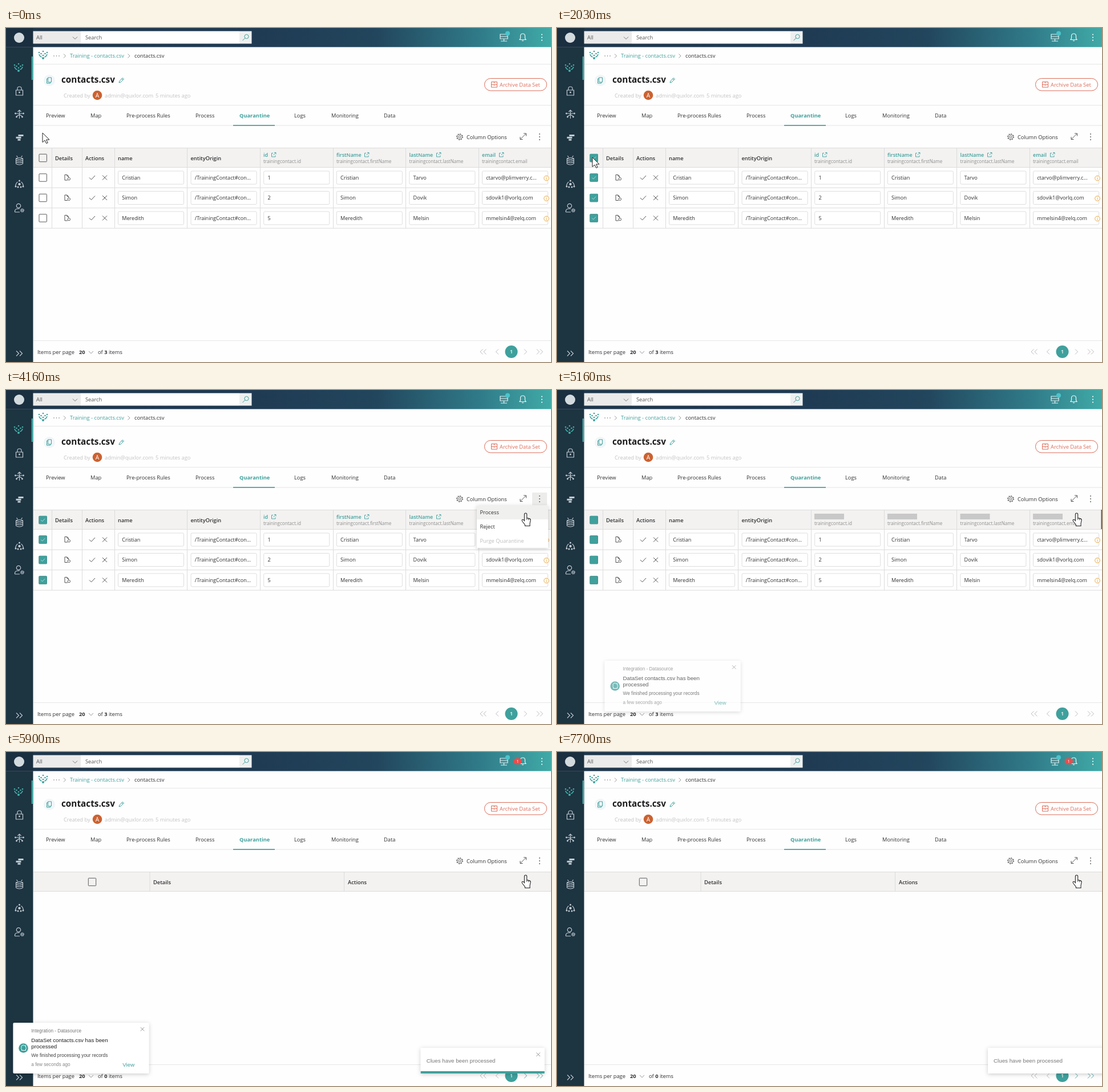
An HTML page for the animation above (7.73 s loop, 955x586 px).

```html
<!DOCTYPE html>
<html lang="en">
<head>
<meta charset="utf-8">
<title>Quarantine</title>
<style>
html, body { margin: 0; width: 100%; height: 100%; overflow: hidden; background: #fefefe; }
svg { display: block; width: 100vw; height: 100vh; font-family: "Open Sans", "Noto Sans", sans-serif; }
.arial { font-family: "Liberation Sans", Arial, sans-serif; }
</style>
</head>
<body>
<svg id="stage" viewBox="0 0 955 586"></svg>
<script>
const LOOP = 7730;
const TEAL = '#3fa09c', INK = '#303030', RED = '#dd6b57', LINE = '#dcdcdc', PALE = '#c3c3c3';

const text = (x, y, s, fill = INK, size = 9.3, weight = 400, more = '') =>
  `<text x="${x}" y="${y}" fill="${fill}" font-size="${size}" font-weight="${weight}" ${more}>${s}</text>`;
const rect = (x, y, w, h, fill, more = '') =>
  `<rect x="${x}" y="${y}" width="${w}" height="${h}" fill="${fill}" ${more}/>`;
const path = (d, stroke = INK, width = 1, fill = 'none') =>
  `<path d="${d}" fill="${fill}" stroke="${stroke}" stroke-width="${width}"/>`;
const dot = (x, y, r, fill) => `<circle cx="${x}" cy="${y}" r="${r}" fill="${fill}"/>`;
const ring = (x, y, r, stroke, width = 1) =>
  `<circle cx="${x}" cy="${y}" r="${r}" fill="none" stroke="${stroke}" stroke-width="${width}"/>`;
const at = (x, y, body) => `<g transform="translate(${x} ${y})">${body}</g>`;
const group = (id, body, more = '') => `<g id="${id}" ${more}>${body}</g>`;
const hline = y => rect(48, y, 907, 1, '#e6e6e6');
const cross = (x, y, r, c = INK) => path(`M${x - r} ${y - r}l${2 * r} ${2 * r}m0 ${-2 * r}l${-2 * r} ${2 * r}`, c, .9);
const dots = (x, y, c, r = 1) => [-5, 0, 5].map(d => dot(x, y + d, r, c)).join('');
const gear = (x, y, r, c) => ring(x, y, r * .38, c, .8) + ring(x, y, r * .82, c, .8) +
  `<circle cx="${x}" cy="${y}" r="${r}" fill="none" stroke="${c}" stroke-width="1.2" stroke-dasharray="${r * .3} ${r * .485}"/>`;

// Icons drawn around their own centre
const flow = c => path('M-7-1Q-6 3-2.5 4M7-1Q6 3 2.5 4', c, 1.5) + dot(0, 6, 2, c) +
  [[-7, -4], [7, -4], [0, -6], [-3.5, -2], [3.5, -2], [0, 1]].map(([x, y]) => dot(x, y, 1.3, c)).join('');
const G = '#c3ccd2';
const sideIcons = [
  [22, 69, flow('#45b0aa')],
  [23.5, 111, path('M-6-2H6V7H-6ZM-3.5-2V-5Q-3.5-8 0-8T3.5-5V-2', G, 1.2) + dot(0, 2, 1.4, G)],
  [23.5, 151, path('M0 8V-7M-3-4L0-7 3-4M-6-1H6M-5 4L0 1 5 4', G, 1.1) +
    [[-7, -1], [7, -1], [-5, 5], [5, 5]].map(([x, y]) => dot(x, y, 1.4, G)).join('')],
  [23.5, 192, rect(-2, -5, 9, 3, G) + rect(-6, -1.2, 9, 3, G) + rect(-3, 2.6, 5, 3, G)],
  [23.5, 233, path('M-6-4Q0-7 6-4V5Q0 9-6 5ZM-6-4Q0-1 6-4M-6-1Q0 2 6-1M-6 2Q0 5 6 2M-3-6L-5-9M3-6L5-9', G, 1.1)],
  [23.5, 274, dot(0, 0, 2.2, G) + path('M-7 3Q-6-2-3-4M7 3Q6-2 3-4', G, 1.2) +
    [[0, -6], [-6.5, 4], [6.5, 4], [-2.5, 5], [2.5, 5]].map(([x, y]) => dot(x, y, 1.5, G)).join('')],
  [22, 316, ring(0, -4, 3.7, G, 1.2) + path('M-6.5 7V5Q-6 1 0 1H2M-6.5 7H2', G, 1.2) + gear(6.5, 4, 3, G)],
  [23, 571, path('M-5-4.5l4.5 4.5-4.5 4.5M1-4.5l4.5 4.5L1 4.5', G, 1.1)]
];

const topBar = rect(0, 0, 955, 33.5, 'url(#bar)') + rect(0, 0, 47.5, 33.5, '#1a2f40') +
  dot(23, 17, 9, '#d3dade') +
  rect(47.5, 5.5, 83.5, 22, '#ebebeb') + rect(131, 5.5, 278, 22, '#fff') + rect(409, 5.5, 21.5, 22, '#eef0f0') +
  text(53, 20, 'All', '#555') + path('M117 15.5l4 4 4-4', '#777') + text(139, 20, 'Search', '#555') +
  ring(421.5, 15, 3.6, TEAL) + path('M419 17.5l-4.5 4.5', TEAL) +
  path('M866 11h13v4h-13zM866 15h13v4h-13zM872.5 19v4M867 23h11', '#e8f2f3', 1.2) + dot(879, 9.5, 4, '#4cc4cb') +
  path('M900 20.5h11l-1.5-2.5v-4q0-4-4-4t-4 4v4zM904 22.5h3', '#eef7f7', 1.2) + dots(939, 16.5, '#fff', 1.1);

const sidebar = rect(0, 33.5, 47.5, 552.5, '#1d3441') + rect(44.7, 50, 2.8, 41, '#43aaa5') +
  sideIcons.map(([x, y, body]) => at(x, y, body)).join('');

const tabs = [[70, 'Preview'], [148, 'Map'], [211, 'Pre-process Rules'], [332, 'Process'],
  [505, 'Logs'], [570, 'Monitoring'], [662, 'Data']];

const heading = at(65, 47, flow(TEAL)) + [84, 88.5, 93].map(x => dot(x, 49, .8, '#777')).join('') +
  path('M101 45.5l3.5 3.5-3.5 3.5M213.5 45.5l3.5 3.5-3.5 3.5', '#999') +
  text(112, 51.5, 'Training - contacts.csv', TEAL) + text(225, 52, 'contacts.csv') + hline(63) +
  dot(76, 92, 10, '#f0f6f8') + path('M73.5 87h6v8h-6zM73.5 89h-2v8h6v-2', TEAL) +
  text(97, 96, 'contacts.csv', '#1c1c1c', 15.3, 700) +
  path('M198 96l1-3 5.5-5.5 2 2-5.5 5.5zM203 89l2 2', TEAL) +
  text(101, 121.5, 'Created by', PALE) + dot(160, 118, 8.3, '#cb6231') +
  text(160, 121.8, 'A', '#fff', 10, 400, 'text-anchor="middle"') +
  text(173, 121.5, 'admin@quxlor.com', PALE) + text(262, 121.5, '5 minutes ago', PALE) +
  `<rect x="838.5" y="88.5" width="109" height="21.5" rx="10.7" fill="#fff" stroke="${RED}"/>` +
  path('M850.5 94.5h10v9.5h-10zM850.5 99.3h10M855.5 94.5v2.5M855.5 99.3v2', RED) +
  text(865, 102.7, 'Archive Data Set', RED) + hline(135) +
  tabs.map(([x, s]) => text(x, 157, s)).join('') + text(409, 157, 'Quarantine', TEAL, 9.3, 700) +
  hline(170.5) + rect(398, 170, 73, 1.7, TEAL) +
  gear(795, 191, 5.3, '#444') + text(807, 194.5, 'Column Options') +
  path('M901.5 195l9.5-9.5M907 185h4.5v4.5M901 191v4.5h4.5', '#444', .9);

const checkbox = (x, y, fill) =>
  `<rect x="${x - 6.7}" y="${y - 6.7}" width="13.4" height="13.4" rx="1" fill="${fill}" stroke="#4a4a4a" stroke-width=".9"/>`;
const checked = y => rect(57.5, y - 7, 14.2, 14.2, TEAL, 'rx="1"');
const tick = y => path(`M61.2 ${y}l2.5 2.5 4.5-4.8`, '#cfe9e7', .8);

const ROWS = [262.5, 298, 333.5], CHECKS = [228, ...ROWS];
const LINES = [80, 133, 190, 317, 445, 573, 700, 828];
const LINKED = [[451, 'id', 469], [579, 'firstName', 632], [706.5, 'lastName', 758], [834, 'email', 868]];
const ENTITY = '/TrainingContact#con...';
const people = [
  ['Cristian', '1', 'Tarvo', 'ctarvo@plimverry.c...'],
  ['Simon', '2', 'Dovik', 'sdovik1@vorlq.com'],
  ['Meredith', '5', 'Melsin', 'mmelsin4@zelq.com']
];

const field = (x, y, s) =>
  `<rect x="${x}" y="${y - 11.5}" width="115" height="23" rx="2" fill="#fff" stroke="#dedede"/>` + text(x + 6.7, y + 3.4, s, INK, 9.1);
const row = ([first, id, last, mail], i) => {
  const y = ROWS[i];
  const cells = [first, ENTITY, id, first, last, mail];
  return checkbox(64.7, y, '#fff') +
    path(`M108 ${y + 4.5}h-5v-9.5h4l2.5 2.5v2M107 ${y - 5}v2.5h2.5`, '#555') + ring(110.3, y + 2.2, 2.2, '#555') +
    path(`M146 ${y}l3.5 3.5 6.5-7`, '#444', .9) + cross(173, y, 4, '#444') +
    cells.map((s, c) => field(196.5 + c * 127.6, y, s)).join('') +
    `<circle cx="947" cy="${y + 1}" r="4.3" fill="#fff" stroke="#eba741"/>` + path(`M947 ${y + .3}v3M947 ${y - 1.7}v1`, '#eba741') +
    rect(48, y + 17.3, 907, 1, LINE);
};
const headBar = rect(48, 210, 907, 35, '#f3f2f1') + rect(48, 210, 907, 1, LINE) + rect(48, 244, 907, 1, LINE);
const head = (x, s) => text(x, 231.5, s, INK, 9.3, 600);

const fullTable = headBar + LINES.map(x => rect(x, 210, 1, 141, LINE)).join('') +
  checkbox(64.7, 228, 'none') + head(86, 'Details') + head(139, 'Actions') + head(196, 'name') + head(323.5, 'entityOrigin') +
  LINKED.map(([x, s]) => text(x, 237, 'trainingcontact.' + s, '#8d8d8d', 8.1)).join('') +
  group('titles', LINKED.map(([x, s, ix]) => text(x, 225.5, s, TEAL, 9, 600) +
    path(`M${ix - 1} 219.5h-2.5v6.5h6.5v-2.5M${ix + 1} 218.5h3v3M${ix - .5} 223l4-4`, TEAL, .9)).join('')) +
  group('bones', LINKED.map(([x]) => rect(x, 217, 52, 10, '#c8c8c8')).join('') + rect(953.5, 210, 1.5, 34, '#555')) +
  people.map(row).join('') +
  group('checks', CHECKS.map(checked).join('') + group('ticks', CHECKS.map(tick).join('')));

const emptyTable = headBar + rect(251.5, 210, 1, 35, LINE) + rect(592, 210, 1, 35, LINE) +
  checkbox(151, 228, 'none') + head(258, 'Details') + head(599, 'Actions');

const count = n => text(161, 571.5, `of <tspan font-weight="700">${n}</tspan> items`);
const chevron = (x, dir, c) => path(`M${x} 563.5l${4.5 * dir} 4.5 ${-4.5 * dir} 4.5`, c, .9);
const nextArrows = c => [908, 930, 936].map(x => chevron(x, 1, c)).join('');
const footer = hline(548) + text(55, 571.5, 'Items per page') + text(128, 571.5, '20', INK, 9.3, 700) +
  path('M145 567l4 4 4-4', '#999') + group('three', count(3) + nextArrows('#b5b5b5')) + group('zero', count(0) + nextArrows(TEAL)) +
  [835.5, 841.5, 863].map(x => chevron(x, -1, '#b5b5b5')).join('') +
  dot(885.5, 568, 11, TEAL) + text(885.5, 571.3, '1', '#fff', 9, 600, 'text-anchor="middle"');

const menu = rect(825, 203, 125, 74, '#fff', 'filter="url(#shade)"') + group('hover', rect(825, 203, 125, 24, '#f0f0ef')) +
  text(830.5, 218, 'Process') + text(830.5, 243, 'Reject') + text(830.5, 268, 'Purge Quarantine', '#bdbdbd');

const notice = rect(12.4, 475, 238, 89, '#fff', 'rx="2" filter="url(#shade)"') +
  cross(239, 486.3, 3.2, '#888') + dot(30.5, 519.5, 8.3, TEAL) +
  path('M27 518q-1-2 1-3h1q1-2.5 2.5 0h3v3q2.5 1.5 0 3v2.5h-7v-2.5q-2.5-1 0-2.5z', '#fff') +
  text(44.3, 492.3, 'Integration - Datasource', '#777', 8.2) +
  text(44.3, 509.2, 'DataSet contacts.csv has been', '#222', 9.75) + text(44.3, 520.3, 'processed', '#222', 9.75) +
  text(44.3, 535.4, 'We finished processing your records', '#444', 8.3) +
  text(44.3, 551.3, 'a few seconds ago', '#888', 8.2) + text(204.3, 552, 'View', TEAL, 9.75);

const clue = rect(726, 519, 217, 45, '#fff', 'rx="1" filter="url(#shade)"') +
  text(736, 545.3, 'Clues have been processed', '#777', 9.75) + cross(932, 530.7, 3.3, '#888') +
  rect(726, 560, 217, 4, TEAL, 'id="bar-left"');

const badge = rect(889.5, 11, 14.5, 10.5, '#ee4b4b', 'rx="5.2"') +
  text(896.7, 19, '1', '#fff', 7.5, 400, 'text-anchor="middle"');

const arrow = path('M0 0V16.5L4 13 6.7 18.5 9.2 17.4 6.6 12H12Z', '#222', 1, '#fff');
const hand = '<g transform="translate(-.5 0) scale(1.07)">' +
  path('M-2 2a2 2 0 0 1 4 0V8l4 1q2.5.6 2 3l-1 5v4h-8v-2l-4-5q-2-3 0-3.5 1.5-.2 3 2z', '#222', 1, '#fff') +
  path('M2 8v3M4.7 9v2.5', '#222', .8) + '</g>';

document.getElementById('stage').innerHTML = `<defs>
  <linearGradient id="bar"><stop offset="0" stop-color="#1f364a"/><stop offset=".45" stop-color="#1f3a53"/>
  <stop offset=".68" stop-color="#22465d"/><stop offset=".87" stop-color="#307b89"/><stop offset="1" stop-color="#40aaa7"/></linearGradient>
  <filter id="shade" x="-20%" y="-30%" width="140%" height="160%"><feDropShadow dx="0" dy="1.5" stdDeviation="3.5" flood-opacity=".2"/></filter></defs>` +
  rect(0, 0, 955, 586, '#fefefe') + heading + group('more', rect(922, 180, 26, 22, '#ececeb')) + dots(935, 191, '#555', .9) +
  group('full', fullTable) + group('empty', emptyTable) + footer + topBar + group('badge', badge) + sidebar +
  group('menu', menu) + group('notice', notice, 'class="arial"') + group('clue', clue, 'class="arial"') +
  group('cursor', group('arrow', arrow) + group('hand', hand));

const el = {};
document.querySelectorAll('#stage [id]').forEach(n => el[n.id] = n);

const span = (t, a, b) => Math.min(1, Math.max(0, (t - a) / (b - a)));
const inOut = u => u < .5 ? 2 * u * u : 1 - 2 * (1 - u) * (1 - u);
const show = (id, on) => el[id].setAttribute('opacity', +on);
const shift = (id, x, y = 0) => el[id].setAttribute('transform', `translate(${x} ${y})`);

// Cursor stops: start, end, x, y
const moves = [[130, 560, 61, 227], [1460, 1560, 62, 227], [2030, 2800, 934, 190], [3400, 3960, 911, 216]];
function cursorAt(t) {
  let x = 64, y = 184;
  for (const [a, b, tx, ty] of moves) {
    const u = inOut(span(t, a, b));
    x += (tx - x) * u;
    y += (ty - y) * u;
  }
  return [x, y];
}

function render(t) {
  const [x, y] = cursorAt(t);
  const onBox = y > 220 && t < 1460, onMore = x > 922 && y < 203;
  const pointing = onBox || onMore || t > 3000;
  shift('cursor', x, y);
  show('hand', pointing);
  show('arrow', !pointing);

  show('checks', inOut(span(t, 900, 1300)));
  show('ticks', t < 4650);
  show('more', t < 4400 && (onMore || t > 3000));
  show('menu', span(t, 3230, 3400) * (1 - span(t, 4400, 4500)));
  show('hover', y > 203 && t > 3230);

  const loading = t >= 4650, done = t >= 5700;
  show('titles', !loading);
  show('bones', loading);
  show('full', !done);
  show('empty', done);
  show('three', !done);
  show('zero', done);
  show('badge', t >= 5650);

  const slide = inOut(span(t, 4560, 5540));
  shift('notice', 238 * (1 - slide));
  show('notice', slide * (1 - span(t, 7330, 7540)));

  const enter = 1 - (1 - span(t, 5600, 5950)) ** 3;
  const leave = span(t, 7570, 7700);
  shift('clue', 239 * (1 - enter) + 29 * leave ** 1.5);
  show('clue', t > 5600);
  el['bar-left'].setAttribute('width', t > 7570 ? 0 : 217 * (1 - span(t, 5950, 7640)));
}

const start = performance.now();
function frame() {
  render((performance.now() - start) % LOOP);
  requestAnimationFrame(frame);
}
render(0);
requestAnimationFrame(frame);
</script>
</body>
</html>
```
